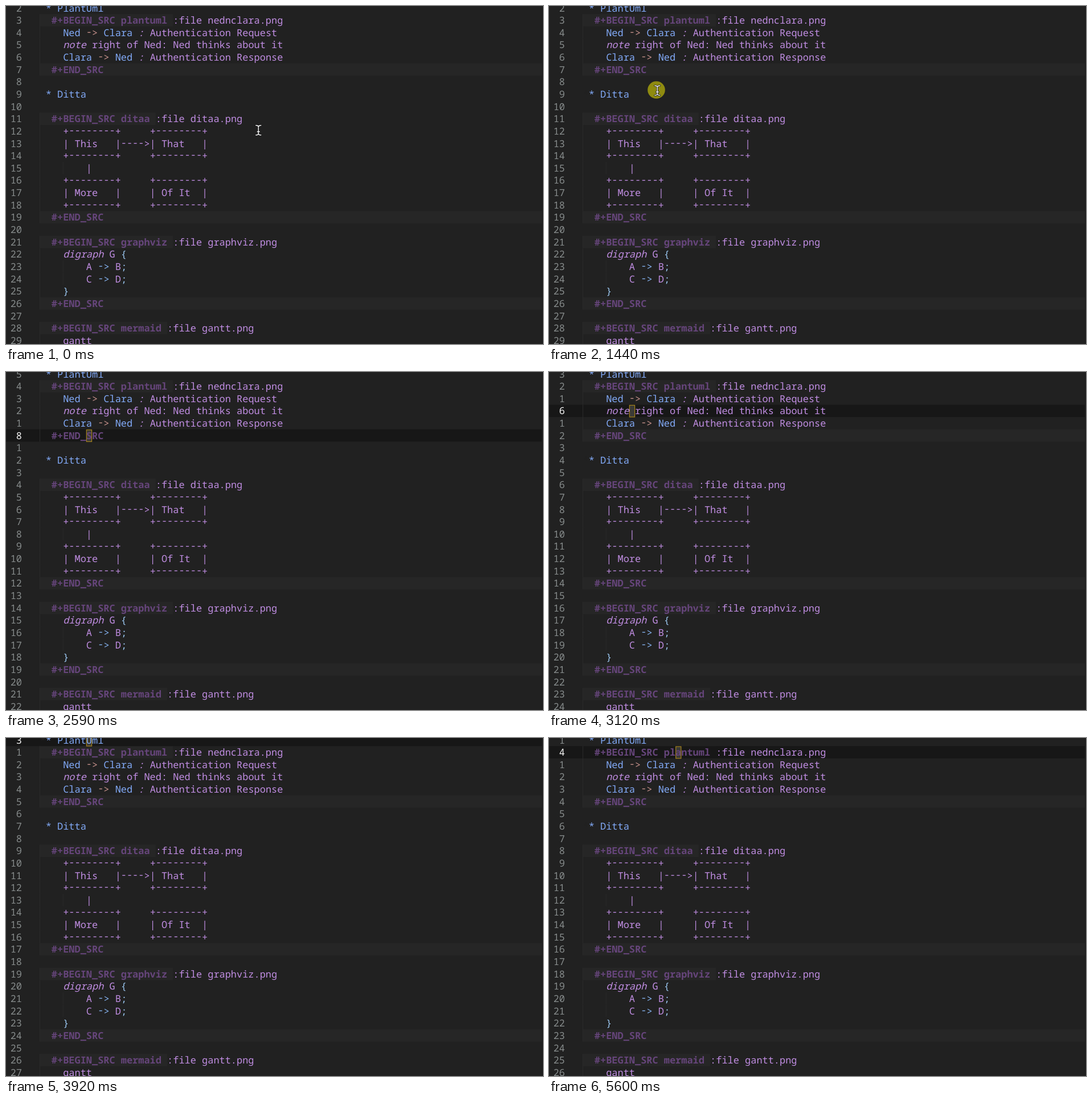
Recreate the animation shown at these times as an HTML page. Size 943 by 594 pixels, loop 8000 ms.

```html
<!DOCTYPE html>
<html lang="en">
<head>
<meta charset="utf-8">
<title>Org source blocks</title>
<style>
  html, body { margin: 0; width: 100%; height: 100%; overflow: hidden; background: #212121; }
  svg { display: block; }
  text {
    font: 16.95px "Noto Sans Mono", "DejaVu Sans Mono", monospace;
    white-space: pre; text-rendering: geometricPrecision; fill: #c08de2;
  }
  .num { fill: #868b8b; text-anchor: end; }
  .num.on { fill: #f4f4f4; }
  .meta { fill: #66457b; font-weight: 700; }
  .head { fill: #82aaf8; }
  .kw { font-style: italic; }
  .arrow { fill: #c9938d; }
  .op { fill: #86b4f2; }
  .brace { fill: #9cc8f2; }
  .hide { fill: #212121; }
  .block { fill: #262626; }
  .guide { fill: #2a2a2a; }
</style>
</head>
<body>
<svg id="stage" width="943" height="594" viewBox="0 0 943 594"></svg>
<script>
const LOOP = 8000, CW = 10.17, LH = 21.64, LEFT = 59.5, TOP = -7.4, BASE = 16.9;
const DASH_LIFT = 1.7;
const stage = document.getElementById('stage');
const colX = c => LEFT + c * CW;
const rowY = r => TOP + r * LH;

function add(tag, attrs, parent = stage) {
  const el = document.createElementNS('http://www.w3.org/2000/svg', tag);
  for (const k in attrs) el.setAttribute(k, attrs[k]);
  parent.appendChild(el);
  return el;
}

// A line is [indent, [style, text], ...]
const heading = s => [0, ['hide', '*'], ['head', '* ' + s]];
const begin = (lang, file) => [2, ['meta', `#+BEGIN_SRC ${lang} `], ['', ':file ' + file]];
const end = [2, ['meta', '#+END_SRC']];
const plain = (indent, s) => [indent, ['', s]];
const message = (from, to, s) =>
  [4, ['head', from], ['arrow', ' -> '], ['head', to], ['kw', ' : '], ['', s]];
const edge = (a, b) => [8, ['', a], ['op', ' -> '], ['', b], ['brace', ';']];
const blank = [0];
const border = plain(4, '+--------+     +--------+');

const lines = [
  heading('PlantUml'),
  begin('plantuml', 'nednclara.png'),
  message('Ned', 'Clara', 'Authentication Request'),
  [4, ['kw', 'note'], ['', ' right of Ned: Ned thinks about it']],
  message('Clara', 'Ned', 'Authentication Response'),
  end,
  blank,
  heading('Ditta'),
  blank,
  begin('ditaa', 'ditaa.png'),
  border,
  plain(4, '| This   |---->| That   |'),
  border,
  plain(8, '|'),
  border,
  plain(4, '| More   |     | Of It  |'),
  border,
  end,
  blank,
  begin('graphviz', 'graphviz.png'),
  [4, ['kw', 'digraph'], ['', ' G '], ['brace', '{']],
  edge('A', 'B'),
  edge('C', 'D'),
  [4, ['brace', '}']],
  end,
  blank,
  begin('mermaid', 'gantt.png'),
  plain(4, 'gantt')
];

// Backgrounds
lines.forEach(([indent, first], r) => {
  if (!first || first[0] !== 'meta') return;
  const width = lines[r] === end ? 941 - LEFT : (indent + first[1].length) * CW;
  add('rect', { class: 'block', x: LEFT, y: rowY(r), width, height: LH });
});
const band = add('rect', { x: 0, width: 943, height: LH, fill: '#171717' });
lines.forEach(([indent], r) => {
  for (const c of [0, 4])
    if (indent > c) add('rect', { class: 'guide', x: colX(c) - .5, y: rowY(r), width: 1, height: LH });
});
add('rect', { x: 941, y: 0, width: 2, height: 594, fill: '#1d1d1d' });
const caret = add('rect', {
  width: CW - 1, height: LH - 1, fill: '#3b3a36', stroke: '#a5821b', 'stroke-width': 1.2
});

// Text, with runs of hyphens raised to the middle of the line
function addText(parts, x, y) {
  const text = add('text', { x, y });
  let lift = 0;
  for (const [style, s] of parts)
    for (const run of s.split(/(-+)/).filter(Boolean)) {
      const next = run[0] === '-' ? DASH_LIFT : 0;
      add('tspan', { class: style, dy: lift - next }, text).textContent = run;
      lift = next;
    }
}
const nums = lines.map(([indent, ...parts], r) => {
  const y = rowY(r) + BASE;
  addText(parts, colX(indent), y);
  return add('text', { class: 'num', x: 28, y });
});

// Mouse pointer and click spot
const spot = add('circle', { cx: 188.5, cy: 147.5, r: 15.3, fill: '#8f8b10' });
const pointer = add('g', { fill: 'none', 'stroke-linecap': 'round' });
const beam = 'M-4.5-8.5Q-1-8.5 0-6.5Q1-8.5 4.5-8.5M0-6.5V6.5M-4.5 8.5Q-1 8.5 0 6.5Q1 8.5 4.5 8.5M-2 2.5H2';
add('path', { d: beam, stroke: '#111', 'stroke-width': 3 }, pointer);
add('path', { d: beam, stroke: '#f2f2f2', 'stroke-width': 1.5 }, pointer);

// Each step changes part of the state and holds until the next one
const steps = [
  [0, { row: -1, num: -1, col: 0, mouse: [443.3, 218.3], spot: 0 }],
  [250, { mouse: [352, 193] }],
  [320, { mouse: [232, 160] }],
  [390, { mouse: [190.3, 148.5] }],
  [1440, { spot: 1 }],
  [1600, { row: 7, num: 7, col: 7, spot: .5 }],
  [1720, { spot: 0 }],
  [2500, { row: 6, num: 6, col: 0, mouse: null }],
  [2590, { row: 5, num: 5, col: 8 }],
  [3120, { row: 3, num: 3 }],
  [3200, { row: 2, num: 2 }],
  [3260, { row: 1 }],
  [3330, { col: 9 }],
  [3720, { num: 1 }],
  [3920, { row: 0, num: 0, col: 8 }],
  [4400, { row: 1, num: 1 }],
  [4580, { col: 9 }],
  [4690, { mouse: [190.3, 148.5] }],
  [4800, { col: 10, mouse: null }],
  [5200, { col: 11 }],
  [5270, { col: 12 }],
  [5330, { col: 14 }],
  [5400, { col: 15, mouse: [190.3, 148.5] }],
  [5600, { col: 16, mouse: null }]
];
const show = (el, on) => el.setAttribute('visibility', on ? 'visible' : 'hidden');

function draw(s) {
  const active = s.row >= 0;
  show(band, active);
  show(caret, active);
  band.setAttribute('y', rowY(s.row));
  caret.setAttribute('x', colX(s.col) + .5);
  caret.setAttribute('y', rowY(s.row) + .9);
  nums.forEach((el, r) => {
    const on = r === s.num;
    el.textContent = s.num < 0 ? r + 2 : on ? r + 3 : Math.abs(r - s.num);
    el.classList.toggle('on', on);
  });
  spot.setAttribute('opacity', s.spot);
  show(pointer, s.mouse);
  if (s.mouse) pointer.setAttribute('transform', `translate(${s.mouse})`);
}

let shown = -1;
function tick() {
  const t = performance.now() % LOOP;
  const past = steps.filter(([at]) => at <= t);
  if (past.length !== shown) {
    shown = past.length;
    draw(Object.assign({}, ...past.map(([, change]) => change)));
  }
  requestAnimationFrame(tick);
}
tick();
</script>
</body>
</html>
```
